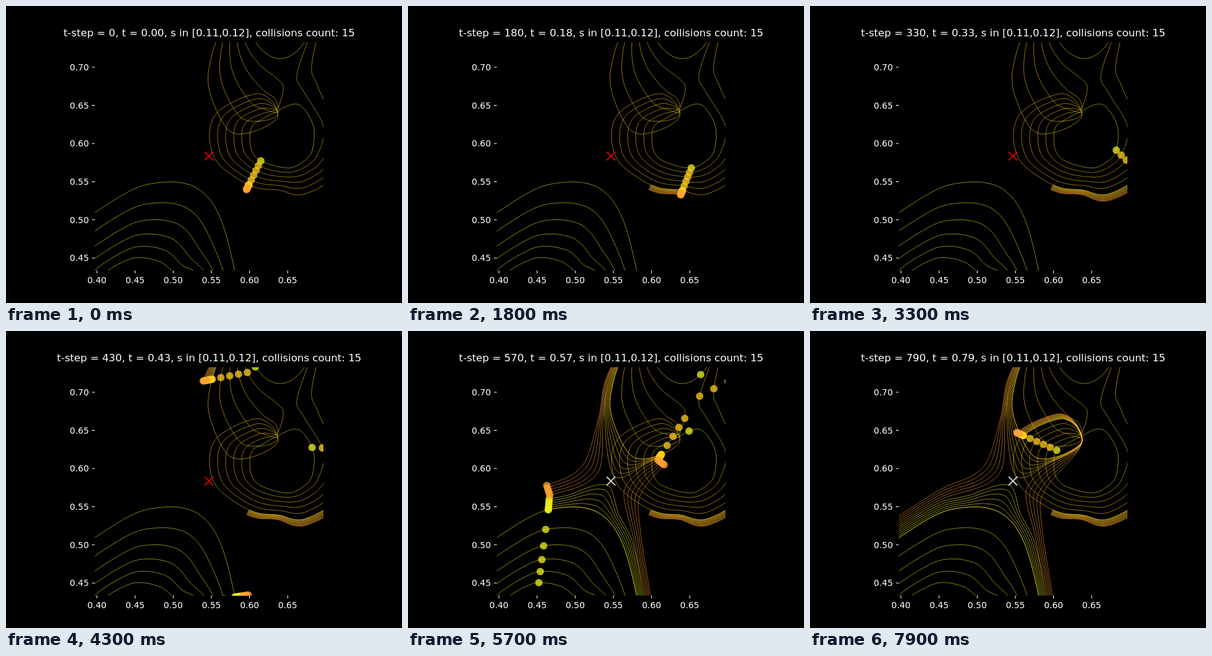
Animation, 640 px wide and 480 px high, one loop 8000 ms. Source, as an HTML page with a canvas:

```html
<!DOCTYPE html>
<html>
<head>
<meta charset="utf-8">
<style>
  html, body { margin: 0; width: 100%; height: 100%; overflow: hidden; background: #000; }
  canvas { display: block; }
</style>
</head>
<body>
<canvas id="stage" width="640" height="480"></canvas>
<script>
const g = document.getElementById('stage').getContext('2d');
const YELLOW = 'rgb(240,240,30)', GOLD = 'rgb(255,205,30)', ORANGE = 'rgb(255,165,48)';
const LAG = 10.4; // both upper bodies share one path, this many seconds apart
const HIT = 5.1, CROSS = [328, 242.5];

// Key poses: time, then x,y of the inner and of the outer reference member.
// Members 1 to 6 are the coarse family, 6 to 7 the fine one.
const upper = [
  [3.9, 378, 30, 354, 22],
  [4.3, 390, 67, 333, 78],
  [4.7, 410, 95, 328, 133],
  [HIT, 434, 114, 357, 198],
  [5.5, 448, 130, 392, 205],
  [6.1, 440, 163, 438, 181],
  [6.5, 430, 170, 430, 154],
  [7, 413, 174, 403, 142],
  [7.9, 388, 188, 345, 169],
  [8.7, 381, 209, 329, 206],
  [9.5, 386, 238, 341, 252],
  [10.4, 408, 258, 392.5, 289],
  [12.2, 455, 269, 443.5, 298],
  [13, 482, 261, 482, 304],
  [13.7, 503, 241, 535, 273],
  [14.6, 513, 195, 580, 205],
  [15.5, 481, 138, 569, 98],
  [16, 470, 113, 565, 65],
  [16.7, 490, 50, 550, 10]
];
const lower = [
  [3.9, 330, 500, 384, 510],
  [4.3, 305, 440, 370, 430],
  [4.7, 272, 430, 350, 352],
  [4.9, 258, 419, 329, 312],
  [HIT, 248, 413, 300, 290],
  [5.5, 223, 407, 252, 285],
  [5.9, 200, 409, 198, 300],
  [6.5, 163, 429, 90, 372],
  [7.2, 132, 462, 20, 430]
];

const mix = (a, b, u) => a + (b - a) * u;
const pose = (rows, u) => rows.map(([t, x, y, X, Y]) => [t, mix(x, X, u), mix(y, Y, u)]);
const upperKeys = m => pose(upper, (m - 2) / 4);
const lowerKeys = m => {
  const u = (m - 1) / 5;
  return pose(lower, u * (.75 + .25 * u * u));
};

// Smooth curve through timed keys [t, x, y].
function at(keys, t) {
  const n = keys.length - 1;
  let i = 0;
  while (i < n - 1 && t > keys[i + 1][0]) i++;
  const h = keys[i + 1][0] - keys[i][0], u = (t - keys[i][0]) / h;
  const slope = (k, c) => {
    const a = keys[Math.max(k - 1, 0)], b = keys[Math.min(k + 1, n)];
    return (b[c] - a[c]) / (b[0] - a[0]);
  };
  return [1, 2].map(c => mix(keys[i][c], keys[i + 1][c], u * u * (3 - 2 * u)) +
    h * u * (1 - u) * ((1 - u) * slope(i, c) - u * slope(i + 1, c)));
}

const first = s => s.keys[0][0], last = s => s.keys[s.keys.length - 1][0];

function trace(strand, from, to) {
  const path = new Path2D();
  const n = Math.ceil((to - from) / .03);
  for (let k = 0; k <= n; k++) path.lineTo(...at(strand.keys, mix(from, to, k / n)));
  return path;
}

const coarse = [], fine = [];
function addCoarse(keys, color, shifts = [0]) {
  const strand = {keys, color, shifts};
  strand.path = trace(strand, first(strand), last(strand));
  coarse.push(strand);
}
const addFine = (keys, color, shifts = [0]) => fine.push({keys, color, shifts});

// The innermost member closes into a loop, and its partner swings by in an arc.
const loop = upperKeys(1).filter(([t]) => t > 6.2 && t < 15);
addCoarse([...loop, [15.5, 472, 159], [loop[0][0] + LAG, loop[0][1], loop[0][2]]], YELLOW, [0, LAG]);
addCoarse([-1.5, -.75, 0, .75, 1.5].map(u => [HIT + .8 * u, 443 + 40 * u, 85 - 26 * u * u]), YELLOW);
for (let m = 1; m <= 6; m++) {
  addCoarse(lowerKeys(m), YELLOW);
  if (m > 1) addCoarse(upperKeys(m), GOLD, [0, LAG]);
}

// Near members bend towards the crossing and back; far ones swap partners there.
const bend = (keys, pull) => keys.map(([t, x, y]) =>
  t === HIT ? [t, mix(x, CROSS[0], pull), mix(y, CROSS[1], pull)] : [t, x, y]);
const swap = (from, to, d) => [
  ...from.filter(k => k[0] < 4.8),
  [HIT, CROSS[0] + 47 * d, CROSS[1] + 24 * d],
  ...to.filter(k => k[0] > 5.8)
];
for (let i = 0; i <= 10; i++) {
  const u = i / 10, up = upperKeys(6 + u), low = lowerKeys(6 + u);
  if (i <= 5) {
    const pull = .75 * (2 * u) ** 1.4;
    addFine(bend(up, pull), GOLD, [0, LAG]);
    addFine(bend(low, pull), YELLOW);
  } else {
    const d = 1.3 * u - .3;
    addFine(swap(low, up, d), ORANGE, [0, LAG]);
    addFine(swap(up, low, -d), ORANGE);
  }
}

function drawTrails(strand, t) {
  g.strokeStyle = strand.color;
  for (const shift of strand.shifts) {
    const from = Math.max(first(strand), shift), to = Math.min(t + shift, last(strand));
    if (to > from) g.stroke(trace(strand, from, to));
  }
}

function drawDots(strand, t) {
  g.fillStyle = strand.color;
  for (const shift of strand.shifts) {
    const time = t + shift;
    if (time < first(strand) || time > last(strand)) continue;
    g.beginPath();
    g.arc(...at(strand.keys, time), 6, 0, 7);
    g.fill();
  }
}

function drawAxes(step) {
  g.fillStyle = g.strokeStyle = '#fff';
  g.lineWidth = 1.1;
  g.font = '13.89px "DejaVu Sans", sans-serif';
  g.beginPath();
  for (let i = 0; i < 6; i++) {
    const x = 147 + 61.65 * i, y = 407.2 - 61.65 * i;
    g.moveTo(x, 427.5);
    g.lineTo(x, 432);
    g.moveTo(139, y);
    g.lineTo(143.5, y);
    g.textAlign = 'center';
    g.fillText((.4 + .05 * i).toFixed(2), x, 448);
    g.textAlign = 'right';
    g.fillText((.45 + .05 * i).toFixed(2), 134, y + 5);
  }
  g.stroke();
  g.font = '16.67px "DejaVu Sans", sans-serif';
  g.textAlign = 'center';
  g.fillText(`t-step = ${step}, t = ${(step / 1000).toFixed(2)}, s in [0.11,0.12], collisions count: 15`, 328.4, 49);
}

function draw(frame) {
  const t = frame / 10;
  g.fillStyle = '#000';
  g.fillRect(0, 0, 640, 480);
  drawAxes(frame * 10);

  g.save();
  g.beginPath();
  g.rect(143.5, 58.5, 369.5, 369);
  g.clip();
  g.globalAlpha = .75;
  g.lineWidth = .75;
  for (const strand of coarse) {
    g.strokeStyle = strand.color;
    g.stroke(strand.path);
  }
  for (const strand of fine) drawTrails(strand, t);
  for (const strand of [...coarse, ...fine]) drawDots(strand, t);

  const [x, y] = CROSS;
  g.globalAlpha = .8;
  g.strokeStyle = t < 4.98 ? '#f00' : '#fff';
  g.lineWidth = 2;
  g.beginPath();
  for (const d of [-7, 7]) {
    g.moveTo(x - 7, y - d);
    g.lineTo(x + 7, y + d);
  }
  g.stroke();
  g.restore();
}

const start = performance.now();
function tick() {
  draw(Math.floor((performance.now() - start) / 100) % 80);
  requestAnimationFrame(tick);
}
tick();
</script>
</body>
</html>
```
